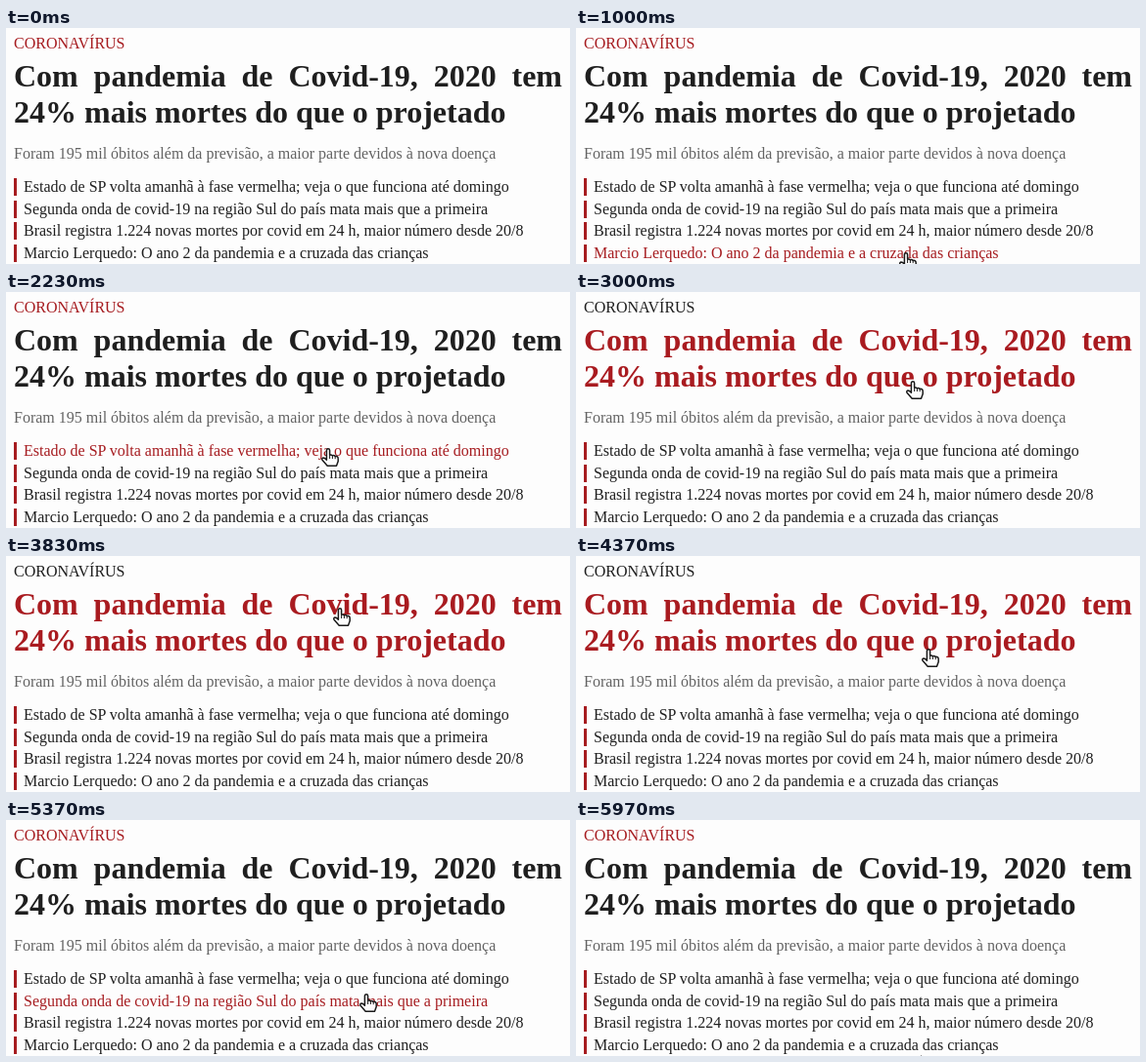
An HTML page with a canvas for the animation above (6.01 s loop, 576 by 242 pixels).

```html
<!DOCTYPE html>
<html lang="pt-BR">
<head>
<meta charset="utf-8">
<style>
  html, body { margin: 0; width: 100%; height: 100%; overflow: hidden; background: #fdfdfd; }
  #stage {
    position: relative; width: 576px; height: 242px; overflow: hidden;
    font: 16px/17px "Liberation Serif", "Times New Roman", serif;
    color: #1f1f1f; white-space: nowrap; cursor: default;
  }
  #stage > * { position: absolute; left: 8px; margin: 0; }
  .tag { top: 7px; color: #a61c20; }
  .title { top: 31px; width: 560px; font: bold 32px/36px "Liberation Serif", "Times New Roman", serif; }
  .title span { display: block; height: 37px; }
  .title span:first-child { text-align-last: justify; }
  .sub { top: 120px; color: #636363; }
  .item { height: 18px; padding-left: 7px; border-left: 3px solid #a61c20; }
  .lead .title { color: #a91b20; }
  .lead .tag { color: #1f1f1f; }
  .item.on { color: #a61c20; }
  #stage > canvas { left: 0; top: 0; }
</style>
</head>
<body>
<div id="stage">
  <div class="tag">CORONAVÍRUS</div>
  <h1 class="title"><span>Com pandemia de Covid-19, 2020 tem</span><span>24% mais mortes do que o projetado</span></h1>
  <p class="sub">Foram 195 mil óbitos além da previsão, a maior parte devidos à nova doença</p>
  <div class="item" style="top:154px">Estado de SP volta amanhã à fase vermelha; veja o que funciona até domingo</div>
  <div class="item" style="top:177px">Segunda onda de covid-19 na região Sul do país mata mais que a primeira</div>
  <div class="item" style="top:199px">Brasil registra 1.224 novas mortes por covid em 24 h, maior número desde 20/8</div>
  <div class="item" style="top:222px">Marcio Lerquedo: O ano 2 da pandemia e a cruzada das crianças</div>
  <canvas id="layer" width="576" height="242"></canvas>
</div>
<script>
const LOOP = 6010;
const stage = document.getElementById('stage');
const items = [...document.querySelectorAll('.item')];
const tops = items.map(el => parseFloat(el.style.top));
const ctx = document.getElementById('layer').getContext('2d');

// pointer path: time, x, y of the tip
const path = [
  [0, 350, 244], [630, 342, 240.5], [1000, 337, 231.5], [1330, 335, 217],
  [1930, 330, 181], [2230, 329, 161], [3000, 344, 92], [3550, 343, 50],
  [3830, 341, 54], [4870, 373, 138], [5800, 358, 216], [5970, 352, 240.5],
  [6010, 350, 244]
];

const hand = new Path2D(
  'M-1.6 1.5 Q-1.6 -.2 0 -.2 Q1.6 -.2 1.6 1.5 V6.3 Q3 5.5 4.4 6.7 ' +
  'Q6 6 7.2 7.4 Q10.2 7 10.2 10 V12.5 L8.5 17.2 H-.8 L-6 11.2 ' +
  'Q-6.8 9.4 -5 9 Q-3.6 9 -1.6 11.2 Z');
const knuckles = new Path2D('M1.6 6.5 V10 M4.4 7 V10 M7.2 7.6 V10.2');
const arrow = new Path2D('M0 0 V17 L3.9 13.5 L6.7 20 L9.6 18.7 L6.8 12.5 H12 Z');

function slope(i, k) {
  const a = path[Math.max(i - 1, 0)], b = path[Math.min(i + 1, path.length - 1)];
  return (b[k] - a[k]) / (b[0] - a[0]);
}

function pointAt(t) {
  let i = 0;
  while (i < path.length - 2 && t >= path[i + 1][0]) i++;
  const a = path[i], b = path[i + 1];
  const d = b[0] - a[0], u = (t - a[0]) / d, v = 1 - u;
  const mix = k => a[k] * v * v * (1 + 2 * u) + b[k] * u * u * (3 - 2 * u) +
    d * u * v * (slope(i, k) * v - slope(i + 1, k) * u);
  return [Math.round(mix(1)), Math.round(mix(2))];
}

function drawHand() {
  ctx.fillStyle = '#fdfdfd';
  ctx.strokeStyle = '#1a1a1a';
  ctx.lineWidth = 1.5;
  ctx.fill(hand);
  ctx.stroke(hand);
  ctx.lineWidth = 1;
  ctx.stroke(knuckles);
}

function drawArrow() {
  ctx.fillStyle = '#262626';
  ctx.strokeStyle = '#fdfdfd';
  ctx.lineWidth = 2;
  ctx.stroke(arrow);
  ctx.fill(arrow);
}

function draw(t) {
  const [x, y] = pointAt(t);
  const over = tops.findIndex(top => y >= top && y < top + 18);
  stage.classList.toggle('lead', y < 145);
  items.forEach((el, i) => el.classList.toggle('on', i === over));

  ctx.clearRect(0, 0, 576, 242);
  ctx.save();
  ctx.translate(x, y);
  ctx.lineJoin = 'round';
  if (over >= 0 || y < 110) drawHand();
  else drawArrow();
  ctx.restore();
}

const start = performance.now();
function tick() {
  draw((performance.now() - start) % LOOP);
  requestAnimationFrame(tick);
}
tick();
</script>
</body>
</html>
```
